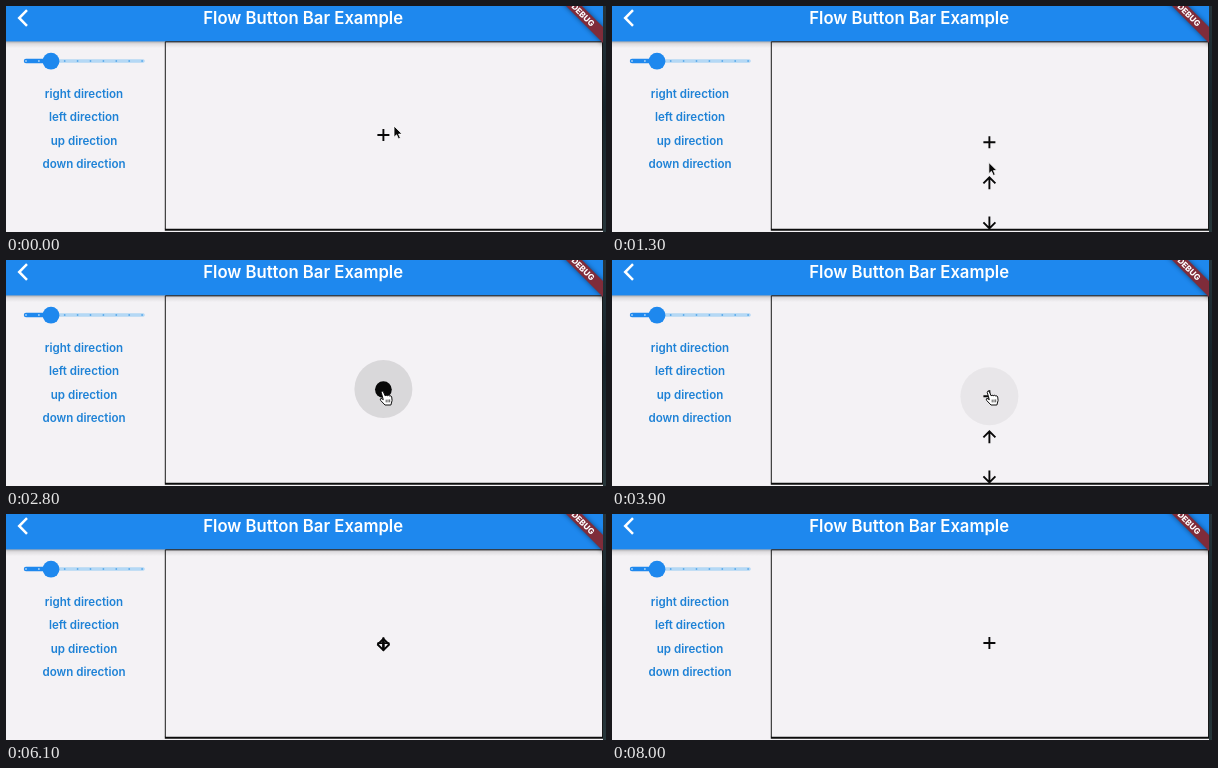
These frames come from a looping animation (600x226 px, 8.1 s). An HTML page:

```html
<!DOCTYPE html>
<html lang="en">
<head>
<meta charset="utf-8">
<title>Flow Button Bar Example</title>
<style>
  html, body { margin: 0; width: 100%; height: 100%; overflow: hidden; background: #f4f2f5; }
  svg { display: block; width: 600px; height: 226px; }
  text { font-family: Inter, Roboto, sans-serif; font-weight: 600; text-anchor: middle; }
  .link { font-size: 11.55px; fill: #1e82d6; }
  .icon { fill: none; stroke: #080808; stroke-width: 1.9; }
</style>
</head>
<body>
<svg viewBox="0 0 600 226">
  <defs>
    <linearGradient id="shade" x2="0" y2="1">
      <stop stop-color="#000" stop-opacity=".32"/>
      <stop offset=".4" stop-color="#000" stop-opacity=".09"/>
      <stop offset="1" stop-color="#000" stop-opacity="0"/>
    </linearGradient>
    <linearGradient id="desk" x2="0" y2="1">
      <stop stop-color="#26343b"/>
      <stop offset=".45" stop-color="#152329"/>
      <stop offset="1" stop-color="#27363a"/>
    </linearGradient>
    <filter id="soft" x="-50%" y="-50%" width="200%" height="200%"><feGaussianBlur stdDeviation="2.5"/></filter>
    <clipPath id="panel"><path d="M159 36H597V223.5H159Z"/></clipPath>
    <clipPath id="window"><path d="M0 0H597V226H0Z"/></clipPath>
  </defs>

  <rect width="600" height="226" fill="#f4f2f5"/>
  <rect y="35" width="597" height="7" fill="url(#shade)"/>
  <rect width="597" height="35.4" fill="#1e88ee"/>
  <path d="M21 4.2L13.2 12L21 19.8" fill="none" stroke="#fff" stroke-width="2.5"/>
  <text x="297.2" y="18" font-size="16.7" fill="#fff">Flow Button Bar Example</text>

  <path d="M20 55H137" stroke="#b4d8f5" stroke-width="3.6" stroke-linecap="round"/>
  <path d="M20 55H45" stroke="#1e88ee" stroke-width="4.4" stroke-linecap="round"/>
  <g id="ticks"></g>
  <circle cx="45" cy="55.2" r="8.4" fill="#1e88ee"/>
  <g id="links"></g>

  <g clip-path="url(#panel)">
    <g id="down"><circle r="29"/><path class="icon" d="M-6 -.7L0 5.3L6 -.7M0 -6.5V4.6"/></g>
    <g id="up"><circle r="29"/><path class="icon" d="M-6 .7L0 -5.3L6 .7M0 6.5V-4.6"/></g>
    <g id="main">
      <circle r="29"/>
      <path id="plus" class="icon" d="M-6 0H6M0 -6V6"/>
      <circle id="dot" cy=".6" r="8.4" fill="#080808"/>
    </g>
  </g>
  <path d="M159.3 223V35.8H596.5V223" fill="none" stroke="#181818"/>
  <path d="M158.8 223.7H597" stroke="#0c0c0c" stroke-width="1.9"/>

  <g clip-path="url(#window)">
    <path d="M540 -20H556L617 41V57Z" fill="#000" opacity=".5" filter="url(#soft)"/>
    <path d="M560 0H576L597 21V37Z" fill="#7f2c3a"/>
    <text transform="translate(577 9) rotate(45)" y="2.9" font-size="8.2" fill="#fff" style="font-weight:800">DEBUG</text>
  </g>
  <rect x="597" width="3" height="226" fill="url(#desk)"/>

  <g id="cursor" stroke-linejoin="round">
    <path id="arrow" d="M0 0V11.2L2.6 8.8L4.5 13L6.4 12.1L4.6 8.1H8.1Z" fill="#080808" stroke="#fff" stroke-width=".8"/>
    <g id="hand" fill="#fff" stroke="#111">
      <path d="M-1.3 1.2Q-1 -.4 .6 .2L2.6 4.8Q3.6 3.6 4.8 4.7Q6 3.7 7 4.9Q8.6 4.2 9.2 6L9.6 9.4L8.4 14H2.5L-1.8 9.5Q-3 7.7 -1.5 7.3L.8 8.7Z"/>
      <path d="M3.7 8.6V11.4M5.5 8.5V11.4M7.2 8.4V11.3" fill="none" stroke-width=".7"/>
    </g>
  </g>
</svg>
<script>
const LOOP = 8100, STEP = 100;
const CENTER = 377.4, CLOSED_Y = 129, OPEN_Y = 136.3, GAP = 40.4;
const TOGGLE = 460, REACH = 13;
const names = ["main", "up", "down"];
const $ = id => document.getElementById(id);

// Clicks alternately open and close the bar.
const clicks = [250, 1860, 2900, 5650];

// The pointer glides to each place, then rests there.
const moves = [
  { at: 0, span: 200, x: 377.3, y: 124.5 },
  { at: 900, span: 700, x: 376.5, y: 180.5 },
  { at: 2100, span: 400, x: 376.5, y: 131 },
  { at: 4200, span: 1000, x: 384, y: 210.5 },
  { at: 5750, span: 300, x: 390, y: 240 }
];

const ramp = (time, at, span) => Math.min(1, Math.max(0, (time - at) / span));
const pulse = (time, from, to) => Math.min(ramp(time, from, 100), 1 - ramp(time, to, 150));
const show = (el, visible) => { el.style.display = visible ? "" : "none"; };
const place = (el, x, y) => el.setAttribute("transform", `translate(${x} ${y})`);

function pointerAt(time) {
  return moves.reduce((from, { at, span, x, y }) => {
    const k = ramp(time, at, span);
    return { x: from.x + (x - from.x) * k, y: from.y + (y - from.y) * k };
  }, { x: 388, y: 120 });
}

$("ticks").innerHTML = Array.from({ length: 10 }, (_, i) =>
  `<circle cx="${20 + i * 12.9}" cy="55" r=".9" fill="${i < 3 ? "#a9d3f6" : "#5caaea"}"/>`).join("");
$("links").innerHTML = ["right", "left", "up", "down"].map((name, i) =>
  `<text class="link" x="78" y="${91.8 + i * 23.35}">${name} direction</text>`).join("");

function draw(time) {
  const open = clicks.reduce((sum, at, i) => sum + (i % 2 ? -1 : 1) * ramp(time, at, TOGGLE), 0);
  const press = Math.max(...clicks.map(at => pulse(time, at - 200, at + 150)));
  const pointer = pointerAt(time);
  let pointing = false;

  names.forEach((name, i) => {
    const group = $(name);
    const y = CLOSED_Y + (OPEN_Y + i * GAP - CLOSED_Y) * open;
    const visible = i === 0 || open > .001;
    const hover = visible && Math.hypot(pointer.x - CENTER, pointer.y - y) < REACH;
    pointing ||= hover;
    place(group, CENTER, y);
    show(group, visible);
    group.firstElementChild.setAttribute("fill-opacity", hover ? .05 + .06 * press : 0);
  });

  // Closing with the up button leaves a dot until the bar opens again.
  const dotted = open < .001 && time > clicks[1] && time <= clicks[2];
  show($("dot"), dotted);
  show($("plus"), !dotted);

  place($("cursor"), pointer.x, pointer.y);
  show($("hand"), pointing);
  show($("arrow"), !pointing);
}

const start = performance.now();
function frame() {
  const time = (performance.now() - start) % LOOP;
  draw(Math.floor(time / STEP) * STEP);
  requestAnimationFrame(frame);
}
draw(0);
requestAnimationFrame(frame);
</script>
</body>
</html>
```
